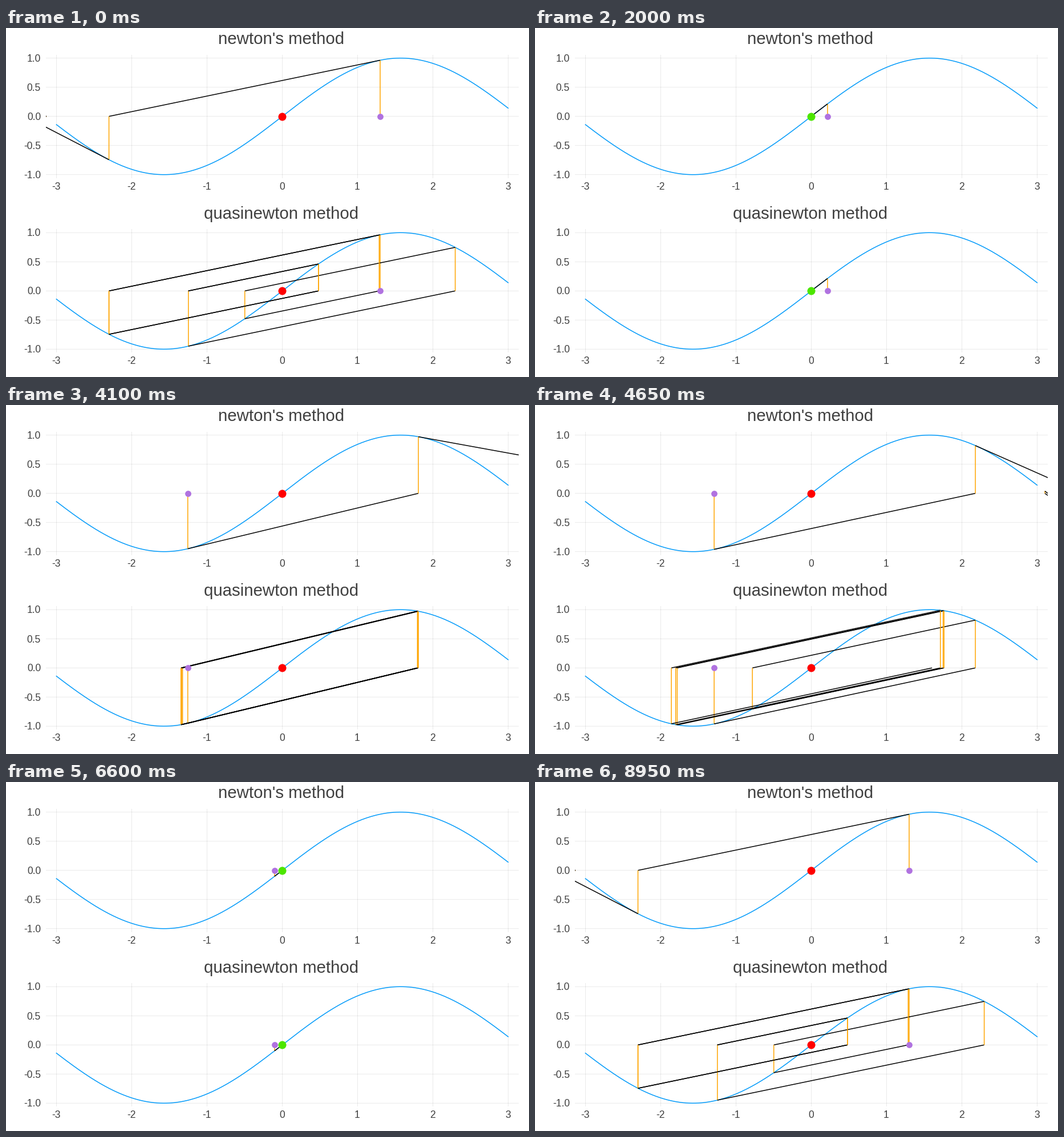
Animation of 917 by 611 pixels, one loop 9 s. Source, as a matplotlib script:

```python
import numpy as np
import matplotlib.pyplot as plt
from matplotlib.animation import FuncAnimation
from matplotlib.collections import LineCollection

W, H, DPI = 917, 611, 64
PX = 72 / DPI                      # points per pixel
FRAMES, STEPS = 180, 9
X0, UNIT_X, UNIT_Y = 484.4, 132.0, 102.0
Y_LIM = 1.06
INK = "#404040"

plt.rcParams["font.family"] = "Liberation Sans"
fig = plt.figure(figsize=(W / DPI, H / DPI), dpi=DPI, facecolor="white")


def label(x, y, text, size, ha):
    fig.text(x / W, 1 - y / H, text, fontsize=size * PX, color=INK,
             ha=ha, va="baseline")


def dot(ax, radius, color, z):
    return ax.plot([0], [0], "o", ms=2 * radius * PX, mew=0, color=color,
                   zorder=z)[0]


class Panel:
    def __init__(self, title, mid, fixed_slope):
        self.fixed_slope = fixed_slope
        half_w, half_h = np.pi * UNIT_X, Y_LIM * UNIT_Y
        ax = fig.add_axes([(X0 - half_w) / W, 1 - (mid + half_h) / H,
                           2 * half_w / W, 2 * half_h / H])
        ax.set_xlim(-np.pi, np.pi)
        ax.set_ylim(-Y_LIM, Y_LIM)
        ax.axis("off")

        grid = dict(color="black", alpha=0.1, lw=0.8 * PX, snap=False)
        for x in range(-3, 4):
            ax.axvline(x, **grid)
            label(X0 - 0.4 + x * UNIT_X, mid + 128, str(x), 17.5, "center")
        for y in np.arange(-1, 1.1, 0.5):
            ax.axhline(y, **grid)
            label(61, mid - y * UNIT_Y + 6.2, f"{y:.1f}", 17.5, "right")
        label(482.5, mid - 126.2, title, 29.4, "center")

        xs = np.linspace(-3, 3, 301)
        ax.plot(xs, np.sin(xs), color="#009afa", lw=1.5 * PX, zorder=3)
        self.path = LineCollection([], linewidths=1.5 * PX, zorder=4,
                                   colors=["orange", "black"], snap=False)
        ax.add_collection(self.path, autolim=False)
        self.root = dot(ax, 7, "red", 5)
        self.start = dot(ax, 5.4, "#b072e0", 6)

    def update(self, start):
        x, segments = start, []
        slope = np.cos(start)
        for _ in range(STEPS):
            y = np.sin(x)
            if not self.fixed_slope:
                slope = np.cos(x)
            nxt = x - y / slope
            segments += [[(x, 0), (x, y)], [(x, y), (nxt, 0)]]
            x = nxt
        self.path.set_segments(segments)
        self.root.set_color("#4ce600" if abs(x) < 0.01 else "red")
        self.start.set_xdata([start])
        return self.path, self.root, self.start


panels = [Panel("newton's method", 154.7, False),
          Panel("quasinewton method", 460.3, True)]


def draw(i):
    start = 1.3 * np.cos(2 * np.pi * i / (FRAMES - 1))
    return [artist for p in panels for artist in p.update(start)]


anim = FuncAnimation(fig, draw, frames=FRAMES, interval=50, repeat=True,
                     repeat_delay=0, blit=False)
plt.show()
```
